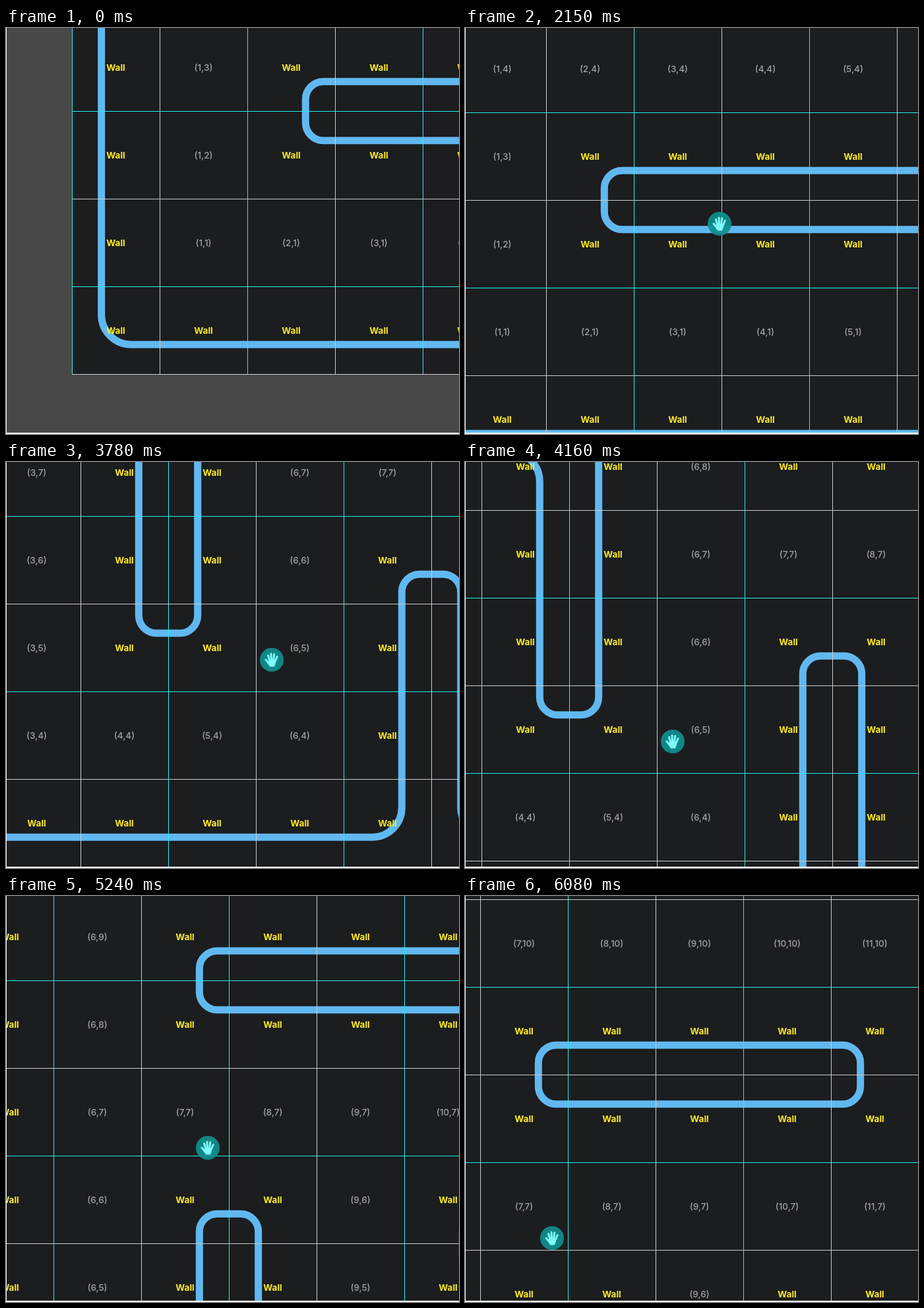
An HTML page with a canvas for the animation above (6310 ms loop, 687 px wide and 616 px high).

```html
<!DOCTYPE html>
<html lang="en">
<head>
<meta charset="utf-8">
<title>Maze map</title>
<style>
html, body { margin: 0; width: 100%; height: 100%; overflow: hidden; background: #fff; }
canvas { display: block; }
</style>
</head>
<body>
<canvas id="stage" width="687" height="616"></canvas>
<script>
const ctx = document.getElementById('stage').getContext('2d');
const W = 687, H = 614, CELL = 133, LEFT = 100, BASE = 525, LOOP = 6310;
const INSET = 21.8 / CELL, CONVEX = 27, CONCAVE = 45;

// step, pointer x, pointer y, camera x, camera y
const keys = [
  [0, 586, 581, 0, 0], [3, 486, 315, 0, 0], [18, 486, 315, 0, 0],
  [19, 522, 240, 0, 0], [22, 629, 162, 0, 0], [27, 325, 331, -304, 169],
  [31, 463, 202, -304, 169], [32, 463, 202, -304, 169],
  [37, 350, 372, -417, 339], [40, 300, 447, -467, 414],
  [44, 455, 226, -467, 414], [52, 315, 424, -607, 612],
  [54, 290, 460, -632, 648], [59, 496, 234, -632, 648],
  [62, 416, 293, -712, 707], [70, 196, 471, -940, 893],
  [77, 132, 519, -1008, 943]
];

// column from, to, row from, to
const blocks = [
  [2, 13, 2, 3], [7, 8, 3, 6], [0, 2, 5, 6], [2, 5, 8, 9],
  [4, 5, 5, 9], [7, 11, 8, 9], [10, 13, 5, 6]
];
const isWall = (i, j) => i === 0 || j === 0 ||
  blocks.some(([a, b, c, d]) => i >= a && i <= b && j >= c && j <= d);

const cellX = i => LEFT + CELL * (i + 0.5);
const cellY = j => BASE - CELL * (j + 0.5);

function pose(step) {
  let k = 0;
  while (k < keys.length - 2 && step >= keys[k + 1][0]) k++;
  const a = keys[k], b = keys[k + 1];
  let u = Math.min(1, Math.max(0, (step - a[0]) / (b[0] - a[0])));
  if (k === keys.length - 2) u = 1 - (1 - u) ** 3;
  return a.slice(1).map((v, i) => Math.round(v + (b[i + 1] - v) * u));
}

// closed outline through cell-space corners, each with an optional radius
function outline(...corners) {
  const pts = corners.map(([i, j, r = CONVEX]) => [cellX(i), cellY(j), r]);
  const last = pts[pts.length - 1];
  ctx.beginPath();
  ctx.moveTo((pts[0][0] + last[0]) / 2, (pts[0][1] + last[1]) / 2);
  pts.forEach(([x, y, r], n) => {
    const next = pts[(n + 1) % pts.length];
    ctx.arcTo(x, y, next[0], next[1], r);
  });
  ctx.closePath();
  ctx.stroke();
}

function box(a, b, c, d) {
  const l = a + INSET, r = b - INSET, lo = c + INSET, hi = d - INSET;
  outline([l, lo], [r, lo], [r, hi], [l, hi]);
}

function drawWalls() {
  const d = INSET;
  ctx.strokeStyle = '#61b8f0';
  ctx.lineWidth = 11;
  outline([-d, -d, CONCAVE], [30, -d], [30, 30], [-d, 30]);
  outline([2 + d, 2 + d], [13 - d, 2 + d], [13 - d, 3 - d], [8 - d, 3 - d, CONCAVE],
    [8 - d, 6 - d], [7 + d, 6 - d], [7 + d, 3 - d, CONCAVE], [2 + d, 3 - d]);
  outline([2 + d, 9 - d], [5 - d, 9 - d], [5 - d, 5 + d], [4 + d, 5 + d],
    [4 + d, 8 + d, CONCAVE], [2 + d, 8 + d]);
  box(-1, 2, 5, 6);
  box(7, 11, 8, 9);
  box(10, 13, 5, 6);
}

function drawLabels() {
  ctx.textAlign = 'center';
  for (let i = 0; i < 14; i++) for (let j = 0; j < 12; j++) {
    const wall = isWall(i, j);
    ctx.font = (wall ? 'bold' : '500') + ' 13.5px Inter, sans-serif';
    ctx.fillStyle = wall ? '#fbec21' : '#a3a4a5';
    ctx.fillText(wall ? 'Wall' : `(${i},${j})`, cellX(i), cellY(j) + 5.5);
  }
}

function drawGrid(ox, oy) {
  const tint = v => v % 2 ? '#c8cccd' : '#22eeee';
  for (let k = 0; k < 16; k++) {
    const x = ox + k * CELL, y = oy - k * CELL;
    ctx.fillStyle = tint(x);
    ctx.fillRect(x, 0, 1, oy);
    ctx.fillStyle = tint(y);
    ctx.fillRect(ox, y, W, 1);
    if (ox < 0) ctx.fillRect(0, y, W, 1);
  }
}

function drawOuterGrid(ox, oy) {
  ctx.fillStyle = '#6a6a6a';
  for (let k = -2; k < 16; k++) {
    ctx.fillRect(ox + k * CELL, 0, 1, H);
    ctx.fillRect(0, oy - k * CELL, W, 1);
  }
}

function drawSelection(ox, oy) {
  ctx.fillStyle = '#ee7433';
  ctx.fillRect(ox - 3, 0, 3, oy + 3);
  ctx.fillRect(ox - 3, oy + 1, W - ox + 3, 2);
  ctx.beginPath();
  ctx.arc(ox + 0.5, oy + 0.5, 5.5, 0, 7);
  ctx.fillStyle = '#3f83e6';
  ctx.fill();
  ctx.strokeStyle = '#16233c';
  ctx.lineWidth = 1.5;
  ctx.stroke();
}

function drawArrow() {
  ctx.beginPath();
  [[0.5, 1], [0.5, 22], [5.5, 17.5], [9.5, 26.5], [13.5, 24.5], [9.7, 16], [16.5, 16]]
    .forEach(p => ctx.lineTo(...p));
  ctx.closePath();
  ctx.strokeStyle = '#222';
  ctx.lineWidth = 1.5;
  ctx.stroke();
  ctx.fillStyle = '#fff';
  ctx.fill();
}

function drawHand() {
  ctx.strokeStyle = ctx.fillStyle = '#7ffafa';
  ctx.lineCap = ctx.lineJoin = 'round';
  ctx.lineWidth = 3;
  [[-3, 2, -5.5, -6.5], [-0.5, 1, -1, -9], [2.5, 1, 3.8, -8.3],
   [5, 3, 8.2, -4.5], [-4, 6, -9, 0]].forEach(([a, b, c, d]) => {
    ctx.beginPath();
    ctx.moveTo(a, b);
    ctx.lineTo(c, d);
    ctx.stroke();
  });
  ctx.beginPath();
  [[-4.5, 0], [5.5, 0], [6, 5], [4, 10.5], [-3, 10.5], [-6, 5.5]]
    .forEach(p => ctx.lineTo(...p));
  ctx.closePath();
  ctx.fill();
  ctx.lineCap = 'butt';
  ctx.lineJoin = 'miter';
}

function drawPointer(step, x, y) {
  ctx.save();
  ctx.translate(x, y);
  if (step >= 8) {
    ctx.beginPath();
    ctx.arc(0, 0, 18, 0, 7);
    ctx.fillStyle = 'rgba(17,142,142,.93)';
    ctx.fill();
  }
  if (step <= 22) drawArrow(); else drawHand();
  ctx.restore();
}

function draw(t) {
  const step = Math.floor((t - 140) / 77);
  const [px, py, cx, cy] = pose(step);
  const ox = LEFT + cx, oy = BASE + cy;
  const picked = Math.min(1, Math.max(0, (step - 9) / 8));

  ctx.fillStyle = '#fff';
  ctx.fillRect(0, 0, W, 616);
  ctx.save();
  ctx.beginPath();
  ctx.rect(1, 0, W - 1, H);
  ctx.clip();
  ctx.fillStyle = '#474747';
  ctx.fillRect(0, 0, W, H);
  ctx.globalAlpha = picked;
  drawOuterGrid(ox, oy);
  ctx.globalAlpha = 1;
  ctx.fillStyle = '#1c1d1f';
  ctx.fillRect(ox, 0, 3000, oy);

  ctx.save();
  ctx.translate(cx, cy);
  drawWalls();
  drawLabels();
  ctx.restore();

  drawGrid(ox, oy);
  ctx.globalAlpha = picked;
  drawSelection(ox, oy);
  ctx.globalAlpha = 1;
  if (step >= 0) drawPointer(step, px, py);
  ctx.restore();
}

const start = performance.now();
function frame() {
  draw((performance.now() - start) % LOOP);
  requestAnimationFrame(frame);
}
frame();
</script>
</body>
</html>
```
